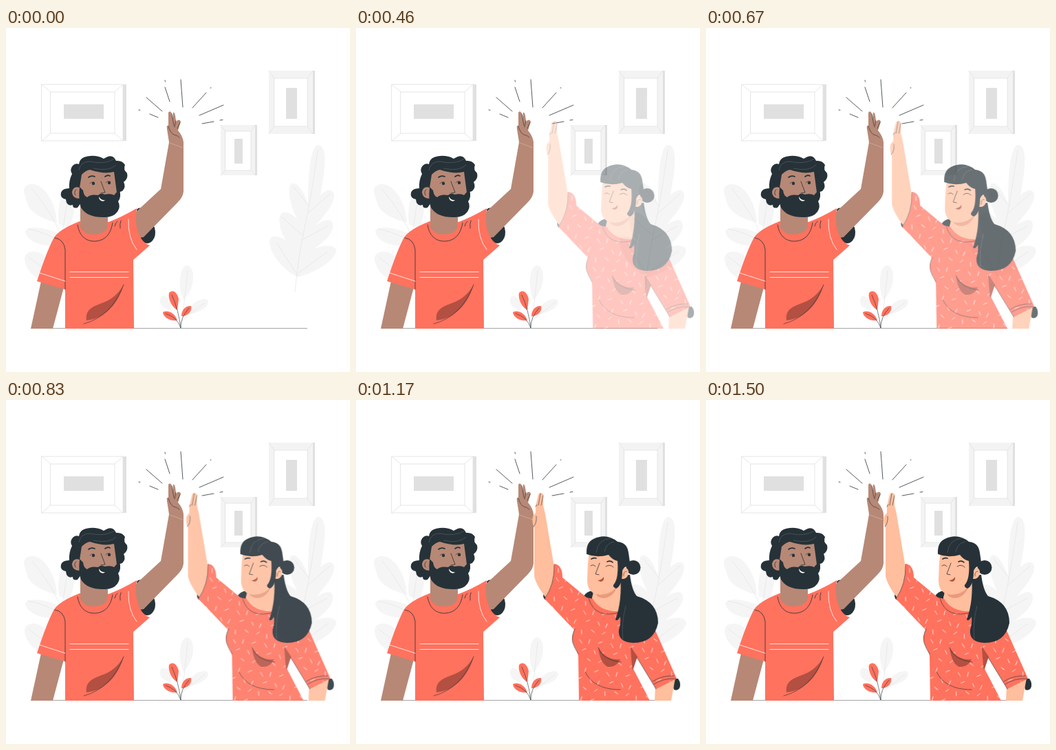
An HTML page without scripts that plays this animation: 500 by 500 pixels, repeating every 1540 ms.

```html
<!DOCTYPE html>
<html lang="en">
<head>
<meta charset="utf-8">
<title>High five</title>
<style>
  html, body { margin: 0; width: 100%; height: 100%; overflow: hidden; background: #fff; }
  svg { display: block; width: 100vw; height: 100vh; }
  .ink { fill: #263238; }
  .shirt { fill: #ff725e; }
  .shade { fill: #b35042; }
  .tan { fill: #b78876; }
  .peach { fill: #ffbe9d; }
  .leaf { fill: #f5f5f5; }
  .grey { fill: #e0e0e0; }
  .line, .thin, .white, .vein, .edge { fill: none; stroke-linecap: round; stroke-linejoin: round; }
  .line { stroke: #263238; stroke-width: .8; }
  .thin { stroke: #263238; stroke-width: .6; }
  .brow { stroke-width: 1.7; }
  .white { stroke: #fff; stroke-width: .8; }
  .vein { stroke: #e4e4e4; stroke-width: .7; }
  .edge { stroke: #e4e4e4; stroke-width: .9; }

  .woman { animation: slide 1540ms infinite, appear 1540ms step-end infinite; }
  @keyframes slide {
    0% { opacity: 0; transform: translateX(30px); animation-timing-function: cubic-bezier(.35, .06, .5, 1.37); }
    94.8%, 100% { opacity: 1; transform: none; }
  }
  /* stays hidden for the first 170 ms */
  @keyframes appear {
    0% { visibility: hidden; }
    11.04%, 100% { visibility: visible; }
  }
</style>
</head>
<body>
<svg viewBox="0 0 500 500">
  <defs>
    <pattern id="sprinkles" width="46" height="42" patternUnits="userSpaceOnUse" patternTransform="rotate(8)">
      <path class="white" d="M4 5l4 5M19 3l-1 6M32 7l5-3M10 20l5-3M27 18l3 5M41 19l-2 6M5 33l1 6M19 31l5 3M36 35l4-4"/>
    </pattern>
    <path id="blouse" d="M290 238C298 239 302 246 302 258L337 287L346 289Q358 309 386 307L400 304L412 335H437L468 405L438 420L410 374L405 391L429 437H326L325 373C324 362 315 356 316 344L319 334L276 289Q291 268 290 238Z"/>
  </defs>

  <g id="pictures">
    <path class="grey" d="M170 82h5v82h-5zM446 62h3v92h-3zM362 141h3v73h-3z"/>
    <path class="edge" d="M52 82H170V164H52ZM65 93H158V153H65ZM52 82l13 11M170 82l-12 11M52 164l13-11M170 164l-12-11"/>
    <path d="M382 62h64v92h-64zM312 141h50v73h-50z" fill="#f3f3f3"/>
    <path class="edge" d="M382 62l8 11M446 62l-8 11M382 154l8-11M446 154l-8-11M312 141l7 9M362 141l-6 9M312 214l7-7M362 214l-6-7"/>
    <path class="edge" style="fill:#fff" d="M390 73h48v70h-48zM319 150h37v57h-37z"/>
    <path class="grey" d="M84 111h58v21H84zM407 87h16v45h-16zM332 161h12v36h-12z"/>
  </g>

  <g id="plants">
    <path class="leaf" d="M424 362C404 353 383 328 383 310C384 300 396 301 407 309C396 291 394 271 403 268C411 267 416 272 423 277C413 258 408 232 415 226C424 224 433 238 439 256C439 225 441 170 454 170C468 171 464 206 457 243C465 235 476 232 477 243C477 256 464 271 451 286C463 278 475 276 475 286C476 300 459 313 448 321C462 314 480 315 480 324C477 340 448 356 424 362Z"/>
    <path class="vein" d="M420 384Q425 330 434 290T453 178M424 360L394 313M425 356L468 325M432 302L401 275M430 308L467 288M441 259L418 231M439 269L471 241"/>
    <path class="leaf" d="M27 242C21 225 43 222 55 235C66 246 73 264 74 283C58 279 35 270 31 255ZM77 285C74 262 80 235 91 234C103 236 103 263 92 292ZM28 295C34 286 65 291 81 302L75 316C57 319 30 312 28 295ZM27 336C27 322 46 322 57 332L52 367C39 361 28 350 27 336Z"/>
    <path class="vein" d="M38 234Q70 272 86 315M32 292Q60 297 85 314M91 240L82 297M33 333L55 350"/>
    <path class="leaf" d="M258 396C250 378 251 347 263 345C275 346 277 375 258 396ZM263 417C266 402 279 393 291 394C299 399 290 412 263 417ZM226 390C220 399 227 407 239 411L242 401C239 394 232 388 226 390Z"/>
    <path class="vein" d="M264 352Q260 395 255 430M289 399L256 425"/>
    <path class="shirt" d="M249 410C241 406 235 393 237 385C242 379 249 384 251 394ZM249 425C239 427 228 420 228 413C236 409 246 415 249 425ZM255 419C255 409 262 403 269 404C271 412 264 419 255 419Z"/>
    <path class="thin" d="M241 388Q251 410 254 436M232 415Q249 420 254 436M266 407Q253 422 254 436"/>
  </g>

  <path class="line" d="M204 101l23 20M231 86l7 21M254 75l3 40M271 116l20-22M281 127l35-15M285 139l17-3M209 125l12 5M231 76l.5 2M297 87l1 0M193 119l2 .5M311 134l4-.5"/>

  <path d="M40 436.500H438" stroke="#a6a6a6"/>

  <g id="man">
    <path class="ink" d="M190 264Q195 258 202 267L216 290Q219 302 213 309Q206 317 196 309Z"/>
    <path class="tan" d="M51 368L36 437H68L84 377ZM186 270L225 234L237 166L234 147Q233 141 236 142L236 123Q238 119 241 124L242 131L243 123Q246 121 247 136Q252 131 254 136L250 149Q257 157 258 166V238Q257 246 250 253L200 304L186 306Z"/>
    <path class="thin" d="M241 125l3 17M247 134l-2 10M253 137l-4 9M236 143q3 10 8 12q5 1 8 4"/>
    <path d="M238 167l19 7" stroke="#d4ad9c" stroke-width=".8"/>
    <path class="shirt" d="M107 281Q76 293 69 306Q59 325 45 368L86 380V437H186L185 337L209 316C196 312 185 292 190 262Q168 275 149 282Z"/>
    <path class="tan" d="M108 250V290Q114 301 128 300Q143 300 148 289V265Z"/>
    <path class="line" d="M104 286Q108 310 129 310Q151 309 155 283M71 305Q84 307 86 322V380M158 288q1-5 4-7M166 291q-1-6 1-11"/>
    <path class="white" d="M93 354.500H178M93 362.500H178M49 356L86 368M178 278Q177 306 190 322"/>
    <path class="shade" d="M117 425C115 410 125 405 139 400Q160 393 171 373C163 400 145 422 117 425Z"/>
    <path class="thin" d="M171 373Q154 419 113 430"/>

    <path class="ink" d="M104 261Q97 263 97 257Q88 260 87 249Q78 247 80 239Q82 233 92 233Q91 222 96 212Q92 206 97 200Q101 196 106 198Q107 187 122 186Q133 185 142 190Q155 181 160 193Q169 192 173 199Q170 206 176 211Q178 219 171 224Q175 231 169 237L160 240L111 220L112 250Z"/>
    <path class="tan" d="M110 213Q116 207 122 206Q143 213 157 209L161 239Q163 257 148 263Q120 265 108 248Q96 248 96 238Q98 229 107 232Z"/>
    <path class="ink" d="M107 231L112 236Q113 244 118 246Q123 241 134 243Q138 239 143 242Q153 240 157 243Q160 239 165 235Q168 246 163 252Q167 260 162 267Q156 275 144 275Q118 276 109 261Q105 252 107 231Z"/>
    <path d="M135 245q3 6 9 5q-2 3-6 1q-3-2-3-6" fill="#fff"/>
    <path class="line" d="M138 223L144 239L138 240M102 235q-4 3-1 8"/>
    <path class="line brow" d="M120 217q4-3 9-1M144 216q4-3 7-1"/>
    <circle class="ink" cx="127" cy="226" r="2.200"/><circle class="ink" cx="150" cy="225" r="2.200"/>
    <path class="thin" d="M122 226q2-3 6-2M145 225q2-3 6-2"/>
    <path d="M106 207Q108 194 122 194Q143 199 158 190M160 199Q150 209 127 204" fill="none" stroke="#5b656a" stroke-width=".6"/>
  </g>

  <g class="woman">
    <path class="ink" d="M276 280l-2 4q0 5 4 7ZM460 405L470 405Q475 412 472 419Q469 423 464 421Z"/>
    <path class="peach" d="M279 289Q263 268 261 256V186Q257 178 259 169L263 164V154L267 137Q270 133 274 137V153L277 166L290 243L298 280ZM437 414L436 437H460L466 404Z"/>
    <path class="thin" d="M270 136l-3 17M274 139l-3 14M263 155l2-3M260 184q5-5 4-15"/>
    <path class="ink" d="M332 286q5-8 14-9l3 16Z"/>
    <path class="peach" d="M350 268L345 287V296L360 312H392V260Z"/>
    <use href="#blouse" class="shirt"/>
    <use href="#blouse" fill="url(#sprinkles)"/>
    <path class="shade" d="M354 360C363 374 373 378 386 377Q380 389 368 388Q357 383 354 360ZM401 358Q408 369 411 373L404 393Q402 379 401 358Z"/>
    <path class="thin" d="M290 239Q291 268 276 289M320 333Q315 341 317 353Q320 362 325 369M335 395Q347 421 386 421M354 360Q360 378 387 381M410 374L438 420M435 413Q449 404 466 405M433 409Q447 400 464 401M340 288Q349 320 388 308"/>

    <path class="ink" d="M386 255L400 254Q403 277 410 285Q441 294 441 324Q435 353 405 353Q382 352 384 334Q387 325 386 315Q381 323 379 319Q389 292 386 255Z"/>
    <circle class="ink" cx="405" cy="243.500" r="10.500"/>
    <path class="peach" d="M341 218Q338 240 338 262Q338 282 357 283Q372 282 381 271L387 260Q398 261 398 249Q396 241 387 245L384 220Z"/>
    <path d="M350 282Q368 286 381 272Q376 286 363 288Q354 288 350 282Z" fill="#eb9a7d"/>
    <path class="ink" d="M337 224Q336 207 347 202Q366 193 382 206Q396 207 398 222L401 243Q393 239 389 248Q389 270 380 274Q375 272 376 269Q384 260 382 234Q374 232 369 225Q352 230 337 224Z"/>
    <path class="line" d="M356 237L350 253L355 254M343 241q4-3 7 1M365 242q6-4 11 1"/>
    <path class="line brow" d="M344 231q4-2 7-1M367 235q5-2 8 1"/>
    <path class="shade" d="M353 262q6 0 9-5q1 7-5 7Z"/>
    <path d="M351 222Q353 202 373 201M363 221Q365 208 377 206M394 299Q387 327 390 348" fill="none" stroke="#59656a" stroke-width=".6"/>
    <path class="thin" d="M391 256q-1-7 4-7"/>
  </g>
</svg>
</body>
</html>
```
